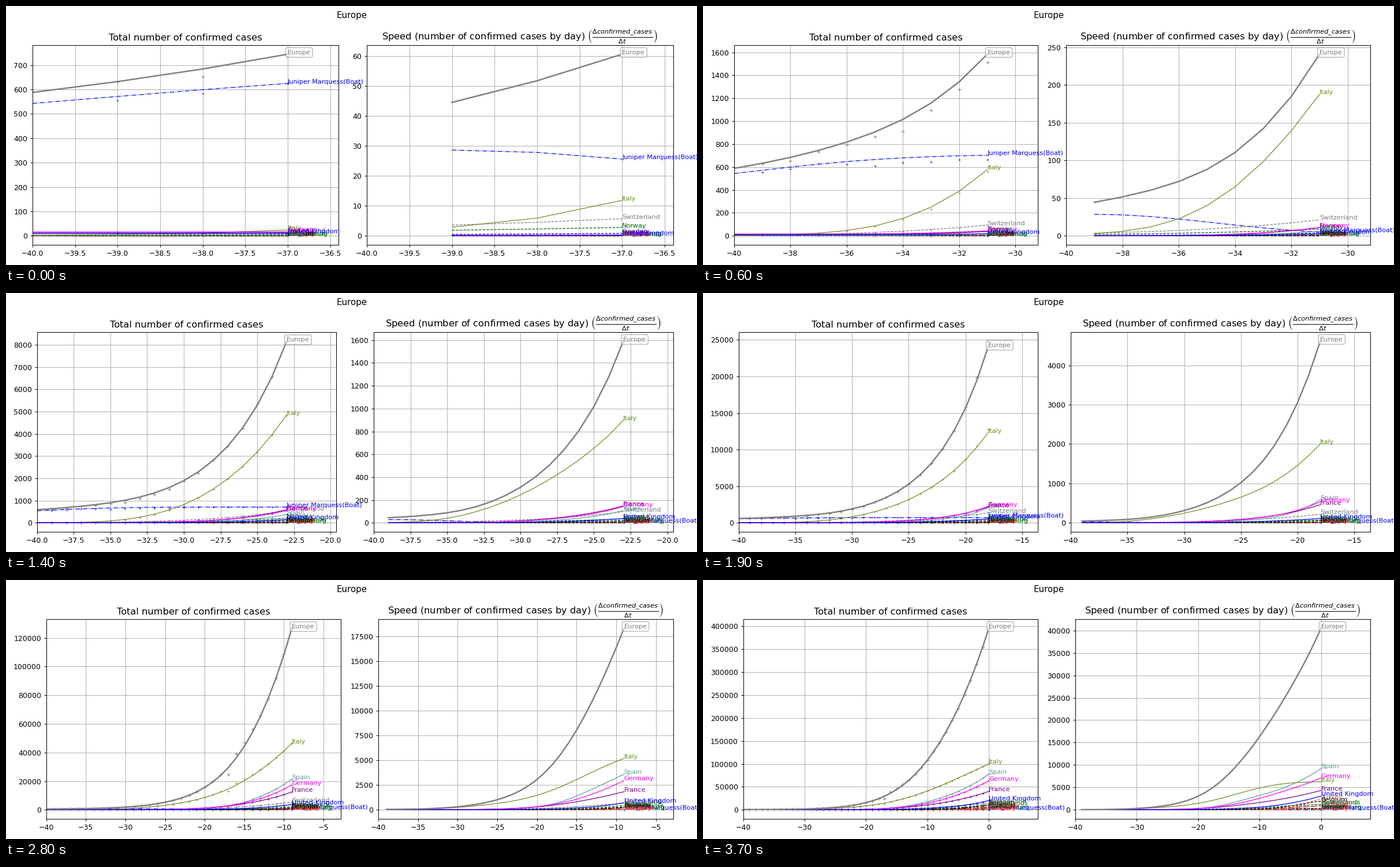
Animation of 1197x450 px, one loop 6.7 s. Source, as a matplotlib script:

```python
import numpy as np
import matplotlib.pyplot as plt
from matplotlib.animation import FuncAnimation

W, H, DPI = 1197, 450, 90
START, STEPS, FRAMES = -40, 38, 67
EM = 12.5                      # tick label size in px
MISSED = -17                   # day without a report
rng = np.random.default_rng(4)
days = np.arange(START, 1)
later = days[1:]


def spline(x, y, t):
    """Natural cubic spline through (x, y), evaluated at t."""
    x, y = np.array(x, float), np.array(y, float)
    h, n = np.diff(x), len(x)
    a, r = np.eye(n), np.zeros(n)
    slope = np.diff(y) / h
    for i in range(1, n - 1):
        a[i, i - 1:i + 2] = h[i - 1], 2 * (h[i - 1] + h[i]), h[i]
        r[i] = 6 * (slope[i] - slope[i - 1])
    m = np.linalg.solve(a, r)
    i = np.clip(np.searchsorted(x, t) - 1, 0, n - 2)
    u, v = x[i + 1] - t, t - x[i]
    return ((m[i] * u**3 + m[i + 1] * v**3) / (6 * h[i])
            + (y[i] / h[i] - m[i] * h[i] / 6) * u
            + (y[i + 1] / h[i] - m[i + 1] * h[i] / 6) * v)


def bell(peak, height, width, power=2):
    return height * np.exp(-(np.abs(later - peak) / width) ** power)


def growth(*keys):
    """Daily cases through key values, smooth on a log scale."""
    return np.exp(spline([-39, -35, -31, -23, -15, -8, 0], np.log(keys), later))


def spread(final, width):
    """Daily cases of a small outbreak that rises to its final value."""
    return bell(0, final, width, 1.6)


# reports swing round the smooth totals
swing = bell(-34, -0.06, 4) + bell(-16, 0.07, 2.5)

# name, colour, line style, total on the first day, daily cases
REGIONS = [
    ("Juniper Marquess(Boat)", "blue", "-.", 543, bell(-39, 28.6, 6)),
    ("Luxembourg", "green", "-.", 0, spread(190, 8)),
    ("Denmark", "crimson", "-.", 0, spread(130, 12)),
    ("Romania", "tomato", "-.", 0, spread(200, 7)),
    ("Poland", "tomato", "-.", 0, spread(190, 8)),
    ("Portugal", "red", "-.", 0, spread(850, 7)),
    ("Hungary", "crimson", "-.", 0, spread(45, 7)),
    ("Sweden", "darkblue", "--", 1, spread(350, 12)),
    ("Norway", "darkgreen", "--", 0, spread(320, 14)),
    ("Austria", "dimgray", "--", 0, spread(900, 9)),
    ("Turkey", "tomato", "--", 0, spread(2400, 3.5)),
    ("Netherlands", "green", "--", 0, spread(1230, 9)),
    ("Belgium", "black", "--", 1, spread(1900, 6)),
    ("Switzerland", "gray", "--", 0, spread(1180, 13)),
    ("Spain", "cadetblue", "-", 2, growth(0.03, 0.6, 6, 107, 1390, 4000, 9240)),
    ("Italy", "olivedrab", "-", 3, growth(2.9, 40, 188, 897, 3050, 5440, 6250)),
    ("France", "purple", "-", 12, growth(0.03, 1, 11, 148, 810, 2040, 4330)),
    ("Germany", "magenta", "-", 16, growth(0.02, 1.1, 10.8, 142, 1070, 3350, 7080)),
    ("United Kingdom", "blue", "-", 10, growth(0.1, 0.5, 2.6, 38, 200, 880, 3080)),
    ("Europe", "gray", "-", 588, growth(44.5, 88, 241, 1590, 8035, 20400, 40500)),
]


def reports(total):
    noise = 0.03 * np.exp((START - later) / 10) * rng.standard_normal(len(later))
    raw = total[1:] * (1 + swing + noise)
    gap = MISSED - later[0]
    raw[gap] = raw[gap - 1]
    return raw


class Region:
    def __init__(self, name, color, style, first, speed):
        self.speed = speed
        self.total = first + np.concatenate([[0], np.cumsum(speed)])
        self.raw = reports(self.total)
        whole = name == "Europe"
        box = dict(boxstyle="round", fc="white", ec="gray", alpha=0.6) if whole else None
        self.lines, self.tags = [], []
        for ax in axes:
            self.lines += ax.plot([], [], style, color=color, lw=2 if whole else 1)
            self.tags.append(ax.text(0, 0, name, color=color, fontsize=9, bbox=box))
        self.marks, = axes[0].plot([], [], "+", color=color,
                                   ms=5 if whole else 3, mew=0.8 if whole else 0.6)

    def show(self, n):
        """Show the first n days after the start."""
        self.lines[0].set_data(days[:n + 1], self.total[:n + 1])
        self.lines[1].set_data(later[:n], self.speed[:n])
        self.marks.set_data(later[:n], self.raw[:n])
        for tag, y in zip(self.tags, (self.total[n], self.speed[n - 1])):
            tag.set_position((days[n], y))


def tick_widths(axis, limits):
    """Visible tick places and the widths of their labels in px."""
    ticks = [t for t in axis.get_majorticklocs() if limits[0] <= t <= limits[1]]
    labels = axis.get_major_formatter().format_ticks(ticks)
    em = {"\u2212": 0.838, ".": 0.318}
    return ticks, [EM * sum(em.get(c, 0.636) for c in s) for s in labels]


def layout(right_x):
    """Make room for the tick labels, as a tight layout does."""
    pad, tick, over = 13.5, 8.5, 27.8
    wide = [max(tick_widths(ax.yaxis, ax.get_ylim())[1]) + tick for ax in axes]
    ticks, widths = tick_widths(axes[0].xaxis, (START, right_x))
    room = (right_x - ticks[-1]) / (right_x - START) * 421.7
    gap = max(over, wide[1]) + pad + max(3.1, widths[-1] / 2 - room)
    left, right, low, high = pad + wide[0], W - pad - over, 34.9, 382
    w = (right - left - gap) / 2
    for ax, x in zip(axes, (left, right - w)):
        ax.set_position([x / W, low / H, w / W, (high - low) / H])


def update(frame):
    n = min(frame, STEPS - 1) + 3
    for region in regions:
        region.show(n)
    europe = regions[-1]
    tops = max(europe.total[n], europe.raw[:n].max()), europe.speed[:n].max()
    right_x = START + 1.2 * n
    for ax, top in zip(axes, tops):
        ax.set_xlim(START, right_x)
        ax.set_ylim(-0.05 * top, 1.05 * top)
    layout(right_x)
    return []


plt.rcParams.update({"font.family": "DejaVu Sans", "font.size": 10,
                     "axes.titlesize": 13})
fig, axes = plt.subplots(1, 2, figsize=(W / DPI, H / DPI), dpi=DPI)
fig.suptitle("Europe")
axes[0].set_title("Total number of confirmed cases")
axes[1].set_title("Speed (number of confirmed cases by day) "
                  r"$\left(\frac{\Delta confirmed\_cases}{\Delta t}\right)$")
for ax in axes:
    ax.grid(True)
regions = [Region(*row) for row in REGIONS]

anim = FuncAnimation(fig, update, frames=FRAMES, interval=100, repeat=True,
                     repeat_delay=0, blit=False)
plt.show()
```
